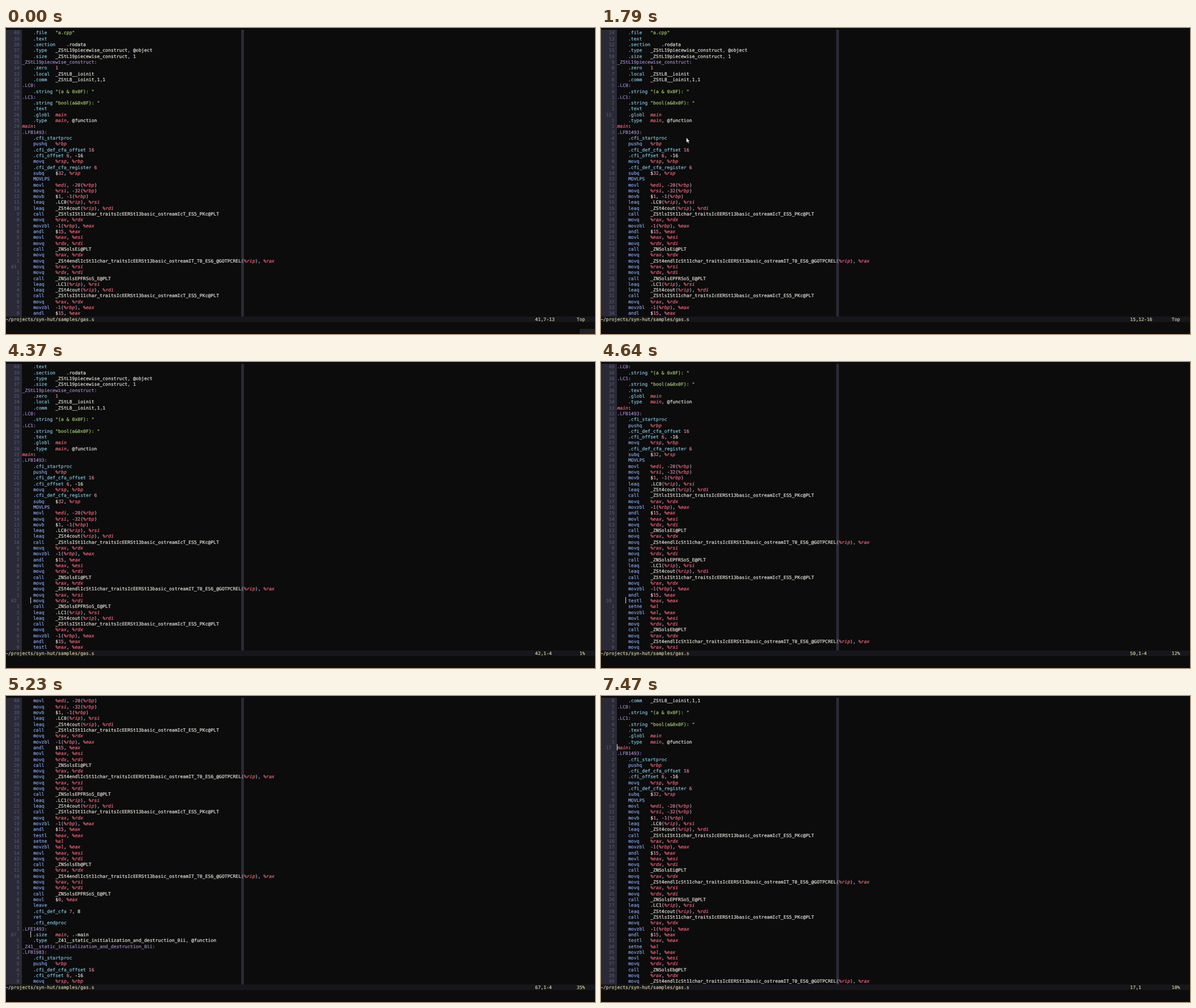
An HTML page for the animation above (8 s loop, 1037 by 540 pixels).

```html
<!DOCTYPE html>
<html lang="en">
<head>
<meta charset="utf-8">
<title>Assembly in a terminal editor</title>
<style>
html, body { margin: 0; width: 100%; height: 100%; overflow: hidden; background: #0c0c0c; }
body { position: relative; }
body > * { position: absolute; }
pre {
  margin: 0; tab-size: 4; white-space: pre; color: #e4e2da;
  font: 8.115px/10.3125px "DejaVu Sans Mono", monospace;
  text-rendering: geometricPrecision; font-variant-ligatures: none;
  -webkit-text-stroke: .2px;
}
.bar { top: 3px; height: 506px; background: #2a2a37; }
#nums { left: -.9px; top: 3.4px; color: #54546d; }
#code { left: 28.4px; top: 3.4px; }
#strip { left: 0; top: 509px; width: 100%; height: 10px; background: #16161d; }
#status { left: -.9px; top: 508.7px; color: #d3cd9c; }
#caret { width: 1px; height: 11px; background: #d8d8d8; }
#corner { left: 1010px; top: 531px; width: 27px; height: 9px; background: #222; }
#mouse { left: 0; top: 0; overflow: visible; }
.s { color: #a3cb70; }
.l { color: #9f86cc; }
.d { color: #7fbfd8; }
.o { color: #82a4ea; }
.r { color: #f4657a; font-style: italic; }
.n { color: #e0829e; }
.b { color: #a6b4d4; }
</style>
</head>
<body>
<div class="bar" style="left:0;width:28px"></div>
<div class="bar" style="left:414px;width:5px"></div>
<div id="strip"></div>
<pre id="nums"></pre>
<pre id="code"></pre>
<pre id="status"></pre>
<div id="caret"></div>
<div id="corner"></div>
<svg id="mouse" width="8" height="12"><path d="M.3 0V8.6L2.2 6.9 3.6 10 4.9 9.4 3.6 6.4H6.2Z" fill="#fff" stroke="#000" stroke-width=".4"/></svg>
<script>
const source = `.file "a.cpp"
.text
.section .rodata
.type _ZStL19piecewise_construct, @object
.size _ZStL19piecewise_construct, 1
_ZStL19piecewise_construct:
.zero 1
.local _ZStL8__ioinit
.comm _ZStL8__ioinit,1,1
.LC0:
.string "(a & 0x0F): "
.LC1:
.string "bool(a&0x0F): "
.text
.globl main
.type main, @function
main:
.LFB1493:
.cfi_startproc
pushq %rbp
.cfi_def_cfa_offset 16
.cfi_offset 6, -16
movq %rsp, %rbp
.cfi_def_cfa_register 6
subq $32, %rsp
MOVLPS
movl %edi, -20(%rbp)
movq %rsi, -32(%rbp)
movb $1, -1(%rbp)
leaq .LC0(%rip), %rsi
leaq _ZSt4cout(%rip), %rdi
call _ZStlsISt11char_traitsIcEERSt13basic_ostreamIcT_ES5_PKc@PLT
movq %rax, %rdx
movzbl -1(%rbp), %eax
andl $15, %eax
movl %eax, %esi
movq %rdx, %rdi
call _ZNSolsEi@PLT
movq %rax, %rdx
movq _ZSt4endlIcSt11char_traitsIcEERSt13basic_ostreamIT_T0_ES6_@GOTPCREL(%rip), %rax
movq %rax, %rsi
movq %rdx, %rdi
call _ZNSolsEPFRSoS_E@PLT
leaq .LC1(%rip), %rsi
leaq _ZSt4cout(%rip), %rdi
call _ZStlsISt11char_traitsIcEERSt13basic_ostreamIcT_ES5_PKc@PLT
movq %rax, %rdx
movzbl -1(%rbp), %eax
andl $15, %eax
testl %eax, %eax
setne %al
movzbl %al, %eax
movl %eax, %esi
movq %rdx, %rdi
call _ZNSolsEb@PLT
movq %rax, %rdx
movq _ZSt4endlIcSt11char_traitsIcEERSt13basic_ostreamIT_T0_ES6_@GOTPCREL(%rip), %rax
movq %rax, %rsi
movq %rdx, %rdi
call _ZNSolsEPFRSoS_E@PLT
movl $0, %eax
leave
.cfi_def_cfa 7, 8
ret
.cfi_endproc
.LFE1493:
.size main, .-main
.type _Z41__static_initialization_and_destruction_0ii, @function
_Z41__static_initialization_and_destruction_0ii:
.LFB1983:
.cfi_startproc
pushq %rbp
.cfi_def_cfa_offset 16
.cfi_offset 6, -16
movq %rsp, %rbp
.cfi_def_cfa_register 6
subq $16, %rsp`;

const LOOP = 8000, ROWS = 49, MARGIN = 8, SCROLLABLE = 73;
const CELL = 4.8857, LINE = 10.3125, LEFT = -.9, TOP = 3.4, GUTTER = 6;
const $ = id => document.getElementById(id);
const clamp = (v, lo, hi) => Math.max(lo, Math.min(hi, v));

// Labels stay at the margin; instructions get tab stops
const lines = source.split('\n').map(s =>
  s.endsWith(':') ? s : '\t' + (s.startsWith('.cfi') ? s : s.replace(' ', '\t')));

const TOKENS = /(?<s>".*")|(?<l>^(?!main)\S+:)|(?<d>(?<=^\t)\.\S+)|(?<o>(?<=^\t)\w+)|(?<p>\.-main)|(?<r>%\w+|\bmain\b)|(?<n>(?<=^\t\S+\s\$?)\d+|-\d+(?=\())|(?<b>[(),])/g;

const paint = line => line.replace(/&/g, '&amp;').replace(TOKENS, (text, ...rest) => {
  const groups = rest.at(-1);
  return `<span class="${Object.keys(groups).find(k => groups[k])}">${text}</span>`;
});
const painted = lines.map(paint);

// Screen column reached after the first n characters
const width = (line, n) =>
  [...line.slice(0, n)].reduce((w, c) => c === '\t' ? w - w % 4 + 4 : w + 1, 0);

// Cursor stops: time, line, character
const stops = [[0, 41, 7], [1060, 15, 12], [2120, 17, 1], [3110, 18, 1]];
for (let n = 0; n <= 24; n++)
  stops.push([3645 + n * 65.7, Math.min(20 + 2 * n, 67), 1]);
stops.push([5560, 68, 1], [5690, 69, 1], [5960, 68, 1], [6090, 67, 1],
  [6350, 67, 2], [6480, 67, 3], [6680, 67, 8], [7340, 17, 1]);

// The view scrolls only as far as the margin demands
let firstLine = 1;
const views = stops.map(([time, line, col]) => {
  firstLine = Math.max(1, clamp(firstLine, line - ROWS + 1 + MARGIN, line - MARGIN));
  return { time, line, col, top: firstLine };
});

const hidden = [[0, 1060], [1790, 2120], [2850, 3110]];
let shown;

function show(view) {
  const { line, col, top } = view, row = line - top;
  const vcol = width(lines[line - 1], col);
  $('code').innerHTML = painted.slice(top - 1, top - 1 + ROWS).join('\n');
  $('nums').textContent = Array.from({ length: ROWS }, (_, i) =>
    i === row ? String(line).padStart(4) : String(Math.abs(i - row)).padStart(5)).join('\n');
  const pos = `${line},${col}` + (vcol === col ? '' : '-' + vcol);
  const part = top === 1 ? 'Top' : (Math.floor((top - 1) * 100 / SCROLLABLE) + '%').padStart(3);
  $('status').textContent = '~/projects/syn-hut/samples/gas.s'.padEnd(191) + pos.padEnd(15) + part;
  $('caret').style.left = Math.floor(LEFT + CELL * (GUTTER + vcol - 1)) + 'px';
  $('caret').style.top = Math.floor(TOP + LINE * row) + 'px';
}

function glide(t, from, to, a, b) {
  const p = clamp((t - from) / (to - from), 0, 1), e = p * p * (3 - 2 * p);
  return a.map((v, i) => v + (b[i] - v) * e);
}

function moveMouse(t) {
  const step = 70 + Math.floor((t - 70) / 66) * 66;
  const [x, y] = t < 1060
    ? glide(step, 70, 850, [1030, 534], [105, 151])
    : glide(step, 1060, 1450, [105, 151], [150, 193.5]);
  $('mouse').style.transform = `translate(${x}px, ${y}px)`;
  $('mouse').style.visibility = t >= 70 && t < 2580 ? 'visible' : 'hidden';
}

function frame(now) {
  const t = now % LOOP;
  const view = views.findLast(v => v.time <= t);
  if (view !== shown) show(shown = view);
  $('caret').style.visibility = hidden.some(([a, b]) => t >= a && t < b) ? 'hidden' : 'visible';
  $('corner').style.visibility = t < 200 ? 'visible' : 'hidden';
  moveMouse(t);
  requestAnimationFrame(frame);
}
frame(0);
</script>
</body>
</html>
```
